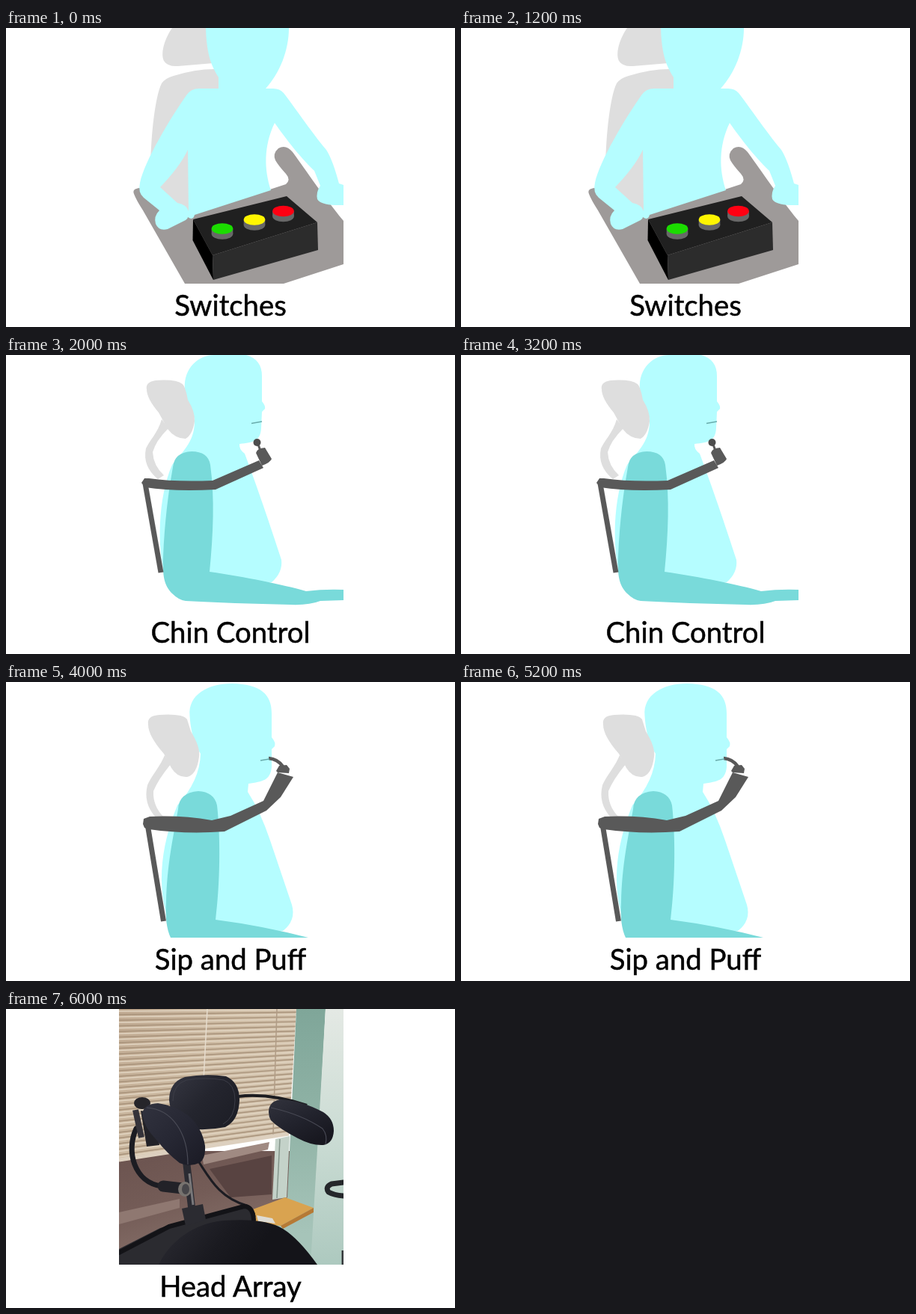
These frames come from a looping animation (600x400 px, 8 s). An HTML page with a canvas:

```html
<!DOCTYPE html>
<html lang="en">
<head>
<meta charset="utf-8">
<title>Wheelchair controls</title>
<style>
  html, body { margin: 0; width: 100%; height: 100%; overflow: hidden; background: #fff; }
  canvas { position: absolute; left: 0; top: 0; }
  #caption {
    position: absolute; left: 0; top: 347.5px; width: 600px;
    text-align: center; white-space: nowrap; color: #000;
    font: 38.3px/1.2 Lato, "Open Sans", sans-serif;
    -webkit-text-stroke: 0.5px #000;
  }
</style>
</head>
<body>
<canvas id="stage" width="600" height="400"></canvas>
<div id="caption"></div>
<script>
const ctx = document.getElementById('stage').getContext('2d');
const caption = document.getElementById('caption');

const SKIN = '#b5fdff', SLEEVE = '#79dada', PALE = '#dedede', STEEL = '#595959';

function fill(color, d) {
  ctx.fillStyle = color;
  ctx.fill(new Path2D(d));
}

function line(color, width, d, cap = 'butt') {
  ctx.strokeStyle = color;
  ctx.lineWidth = width;
  ctx.lineCap = cap;
  ctx.lineJoin = 'round';
  ctx.stroke(new Path2D(d));
}

function oval(color, x, y, rx, ry = rx) {
  ctx.fillStyle = color;
  ctx.beginPath();
  ctx.ellipse(x, y, rx, ry, 0, 0, Math.PI * 2);
  ctx.fill();
}

function blend(x0, y0, x1, y1, ...colors) {
  const g = ctx.createLinearGradient(x0, y0, x1, y1);
  colors.forEach((c, i) => g.addColorStop(i / (colors.length - 1), c));
  return g;
}

function button(color, x, y) {
  oval('#686868', x, y + 7, 14.3, 7.3);
  fill('#686868', `M${x - 14.3} ${y}h28.6v7h-28.6z`);
  oval(color, x, y, 14.3, 7.3);
}

function switches() {
  fill(PALE, 'M222 0C212 14 206 34 211 44Q216 52 230 51L277 47L268 0Z');
  fill(PALE, 'M193 212C192 150 199 92 208 74Q213 67 224 64Q255 54 284 55L290 250H243Z');
  fill('#9e9a99', 'M179 214Q168 215 171 222Q174 230 183 244L239 342H371L451 316V258' +
    'C420 220 395 182 383 166Q374 155 364 161Q356 168 360 177Q364 184 374 195' +
    'Q381 203 374 209L243 252L195 214Z');
  fill(PALE, 'M243 160L200 208L229 235L243 240Z');
  fill(SKIN, 'M267 0C268 38 276 53 284 66V81H258Q247 81 241 90C220 120 185 178 179 207' +
    'Q176 220 184 227L205 244Q197 252 200 262Q204 272 216 269L240 257Q243 255 243 253' +
    'Q250 258 252 250L354 217C345 190 344 158 359 127C380 157 400 180 412 191L420 211' +
    'Q414 220 416 229Q420 236 440 237H451V210L445 208C440 189 434 172 428 163' +
    'C405 135 385 105 371 87Q366 81 357 81H347C366 60 378 30 378 0Z' +
    'M243 163L244 245Q241 236 229 234L206 213C222 196 235 180 243 163Z');
  fill('#202020', 'M250 256L375 225L416 260L276 304Z');
  fill('#000', 'M250 256L276 304L277 337L249.500 284Z');
  fill('#2c2c2c', 'M276 304L416 260L417 297L277 337Z');
  button('#1bdc00', 289, 268.5);
  button('#fff500', 332, 256.5);
  button('#ff0012', 370.5, 245);
}

function chinControl() {
  fill(PALE, 'M208 86C203 104 192 114 187 125Q182 149 203 166L211 161Q197 148 196 130Q200 115 217 98Z');
  fill(SKIN, 'M239 45C237 17 258 0 278 0H321Q342 6 342 28V62Q347 68 346 72L342 76L341 98' +
    'C340 115 331 117 312 119Q311 126 319 132C334 172 354 230 368 274Q370 291 355 304' +
    'L280 312L214 300C201 260 203 190 222 147C239 126 253 114 252 85Q241 68 239 45Z');
  fill(PALE, 'M188 46Q186 36 200 34Q227 32 236 39Q240 43 243 60Q253 76 252 89Q249 107 240 112' +
    'Q226 112 216 99L204 77Q188 58 188 46Z');
  fill(SLEEVE, 'M223 150Q225 130 248 129Q270 129 273 147C279 190 277 240 272 290' +
    'C320 297 370 307 401 316Q425 313 451 314V328L420 329Q405 335 380 334' +
    'C330 333 280 331 240 329Q231 328 222 319C211 308 209 295 210 270C212 222 217 184 223 150Z');
  line(STEEL, 7, 'M186 172L207 291');
  fill(STEEL, 'M181 171L185 165L191 165Q225 170 276 168L338 141L344 151L280 180Q225 183 186 177Z');
  fill(STEEL, 'M334 131Q335 125 346 124L355 139Q353 144 342 148Z');
  line(STEEL, 3, 'M336 117L340 128');
  oval('#4d4d4d', 335.5, 117, 5);
  line('#69abab', 1.5, 'M328 91.500L342 89');
}

function sipAndPuff() {
  fill(PALE, 'M212 98C206 113 194 126 189 138Q183 162 200 181H211Q196 166 197 146Q203 131 220 110Z');
  fill(SKIN, 'M245.500 45C243 17 270 2 302 2C340 3 355 16 355 42V74Q361 81 359 86L355 90V114' +
    'C353 132 343 133 324 136L323 147Q340 173 353 212L382 298' +
    'Q388 319 370 333L225 336C198 286 206 220 229 165Q259 132 260 96Q247 75 245.500 45Z');
  fill(PALE, 'M190 57Q188 45 205 44Q236 42 242 50L247 66Q260 87 258 100Q255 124 242 127' +
    'Q229 128 221 115L211 96Q190 72 190 57Z');
  fill(SLEEVE, 'M230 170Q231 148 257 146Q278 147 282 165C287 210 286 270 280 318Q342 326 404 342' +
    'H220Q212 325 214 295C215 245 223 210 230 170Z');
  line(STEEL, 7, 'M189 190L210.500 320');
  fill(STEEL, 'M183 190L184 183L192 180Q235 178 275 185L300 179L344 159L363 121L384 127L367 154L348 172' +
    'L292 200Q240 204 191 197L185 195Z');
  fill(STEEL, 'M361 119L365 112L375 111L379 116L378 122L363 121Z');
  line(STEEL, 4.5, 'M351 102Q363 103 370 113');
  line('#69abab', 1.5, 'M340 105L352 103');
}

function blinds() {
  const shape = 'M151 0H388L378 168L151 204Z';
  fill(blend(151, 0, 380, 150, '#c0aa92', '#cfbda5', '#d3c4af'), shape);
  ctx.save();
  ctx.clip(new Path2D(shape));
  for (let y = 0; y < 240; y += 7.5) {
    const end = y * 0.84 - 2;
    line('#a8927a', 1.4, `M151 ${y}L388 ${end}`);
    line('#e2d5c2', 1.4, `M151 ${y + 3}L388 ${end + 3}`);
  }
  ctx.restore();
  line('#e6dccd', 1.5, 'M269 0L264 95');
  line('#b09c86', 1.5, 'M362 0L357 168');
  line('#ddd0bf', 5, 'M151 202L378 167');
}

function room() {
  fill(blend(151, 200, 190, 342, '#6c5450', '#745c57', '#867069'), 'M151 190H380V342H151Z');
  fill('#a08a82', 'M262 196L352 178L350 188L264 208Z');
  fill('#584341', 'M272 214L355 196V248L300 252Z');
  fill('#8f7871', 'M151 272L232 254V266L151 288Z');
  blinds();
  fill('#c4d2c9', 'M360 174L379 170L375 252L356 255Z');
  line('#84958b', 1.5, 'M366 174L362 253');
  fill(blend(390, 0, 400, 300, '#7fa699', '#90b3a6', '#a6c4b9'), 'M388 0H427L409 342H330V290L376 252Z');
  fill(blend(430, 0, 445, 342, '#e4e9e4', '#cbdcd4', '#adc9bf'), 'M427 0H451V342H407Z');
  fill('#d9a350', 'M330 268L373 252L411 266L367 290L328 286Z');
  fill('#b67a35', 'M367 290L411 266V272L370 294Z');
}

function supports() {
  line('#1c1c22', 7, 'M174 160C160 190 171 232 208 237', 'round');
  line('#1c1c22', 3, 'M258 205C273 228 286 253 322 263Q331 268 332 278');
  line('#1c1c20', 4, 'M310 117Q352 112 402 129');
  oval('#26252a', 182, 126, 11, 8);
  line('#35333a', 8, 'M173 135L181 172');
  fill('#222228', 'M180 136L200 140L205 182L188 184Z');
  oval('#6d6a69', 195, 155, 3, 5);
  line('#2b2b32', 10, 'M241 204L250 282');
  line('#78777a', 3, 'M245 220L250 262');
  line('#222228', 15, 'M210 237L236 240', 'round');
  oval('#77736f', 239, 241, 9, 10);
  oval('#47464a', 240, 241, 5, 7);
}

function pads() {
  fill(blend(218, 90, 300, 165, '#353641', '#24252e', '#1c1d25'),
    'M218 122Q218 98 239 91Q267 86 294 90Q312 98 312 122Q311 149 293 158Q268 163 244 160Q221 151 218 122Z');
  line('#3c3d47', 1, 'M223 123Q223 101 241 95Q267 91 291 95Q306 101 306 122Q306 145 290 154');
  fill(blend(190, 130, 265, 205, '#30313d', '#262733', '#1b1b25'),
    'M182 140Q184 127 203 126Q225 129 243 142Q262 158 266 183Q267 201 258 206Q245 212 232 206' +
    'Q215 193 201 175Q184 158 182 140Z');
  line('#4a4b56', 1.2, 'M188 132C222 134 243 166 243 208');
  fill(blend(370, 120, 400, 183, '#2f303a', '#22232d', '#181820'),
    'M351 138Q351 124 366 121Q394 122 424 138Q438 147 438 163Q437 180 424 182Q409 183 390 173' +
    'Q365 160 354 149Q351 144 351 138Z');
  line('#484954', 1.2, 'M354 132Q395 141 423 160Q430 169 427 181');
}

function seat() {
  fill('#2b2b30', 'M151 321L206 293L322 263L332 281L245 342H151Z');
  line('#131317', 6, 'M151 326L218 291L318 264Q330 264 331 282', 'round');
  fill('#2b2b31', 'M235 267L263 261L267 282L240 290Z');
  fill('#dedbd3', 'M335 276L356 280L360 287L337 284Z');
  fill(blend(250, 285, 320, 342, '#24242b', '#1a1a20', '#141419'),
    'M204 342C220 309 252 287 290 283Q347 279 370 294Q391 307 416 342Z');
  line('#25272b', 7, 'M451 232L435 234Q426 238 431 245Q438 249 451 250', 'round');
  line('#35383b', 3, 'M450 323V342');
}

function headArray() {
  room();
  supports();
  pads();
  seat();
}

const scenes = [
  ['Switches', switches],
  ['Chin Control', chinControl],
  ['Sip and Puff', sipAndPuff],
  ['Head Array', headArray],
];
const HOLD = 2000;
let current = -1;

function show(index) {
  const [title, draw] = scenes[index];
  current = index;
  caption.textContent = title;
  ctx.fillStyle = '#fff';
  ctx.fillRect(0, 0, 600, 400);
  ctx.save();
  ctx.beginPath();
  ctx.rect(151, 0, 300, 342);
  ctx.clip();
  draw();
  ctx.restore();
}

const start = performance.now();
function tick() {
  const index = Math.floor((performance.now() - start) / HOLD) % scenes.length;
  if (index !== current) show(index);
  requestAnimationFrame(tick);
}
tick();
</script>
</body>
</html>
```
